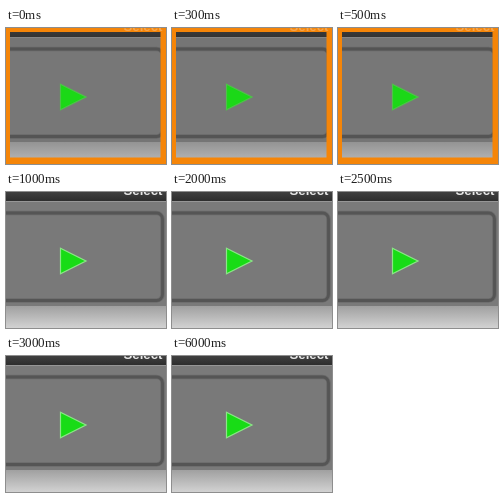
Animation, 160 px wide and 136 px high, one loop 8 s. Source, as an HTML page with a canvas:

```html
<!DOCTYPE html>
<html lang="en">
<head>
<meta charset="utf-8">
<title>Play button</title>
<style>
html, body { margin: 0; width: 100%; height: 100%; overflow: hidden; }
canvas { display: block; width: 160px; height: 136px; }
</style>
</head>
<body>
<canvas id="stage"></canvas>
<script>
const W = 160, H = 136, LOOP = 8000, HIGHLIGHT_END = 1000;
const canvas = document.getElementById('stage');
const ctx = canvas.getContext('2d');
const dpr = window.devicePixelRatio || 1;
canvas.width = W * dpr;
canvas.height = H * dpr;
ctx.scale(dpr, dpr);

const highlighted = {
  bar: ['#3d3d3d', '#333333'], rim: '#858585', page: '#757575',
  floor: ['#939393', '#bababa'],
  border: '#545454', panel: '#777777',
  play: '#1bd817', outline: '#4fc24a'
};
const plain = {
  bar: ['#404040', '#2d2d2d'], rim: '#969696', page: '#7a7a7a',
  floor: ['#a0a0a0', '#d2d2d2'],
  border: '#555555', panel: '#797979',
  play: '#18dc16', outline: '#8ce688'
};

function rect(x, y, w, h, fill) {
  ctx.fillStyle = fill;
  ctx.fillRect(x, y, w, h);
}

function gradient(y0, y1, colors) {
  const g = ctx.createLinearGradient(0, y0, 0, y1);
  colors.forEach((c, i) => g.addColorStop(i / (colors.length - 1), c));
  return g;
}

function label(color) {
  ctx.font = 'bold 13.2px "Liberation Sans", Arial, sans-serif';
  ctx.fillStyle = color;
  ctx.fillText('Select', 117.5, 3.4);
}

function outline(color, width) {
  ctx.strokeStyle = color;
  ctx.lineWidth = width;
  ctx.stroke();
}

function panel(look) {
  ctx.beginPath();
  ctx.roundRect(-20, 21, 176.5, 87.5, 6);
  ctx.fillStyle = look.panel;
  ctx.fill();
  // A wide faint stroke softens the edges of the border.
  ctx.globalAlpha = 0.4;
  outline(look.border, 4.6);
  ctx.globalAlpha = 1;
  outline(look.border, 2.8);
}

function playIcon(look) {
  ctx.beginPath();
  ctx.moveTo(54.5, 56.3);
  ctx.lineTo(80, 69);
  ctx.lineTo(54.5, 81.7);
  ctx.closePath();
  ctx.fillStyle = look.play;
  ctx.fill();
  outline(look.outline, 1.2);
}

function scene(look) {
  rect(0, 0, W, H, look.page);
  rect(0, 0, W, 9, gradient(0, 9, look.bar));
  rect(0, 9, W, 1, look.rim);
  rect(0, 114, W, 22, gradient(114, 136, look.floor));
  panel(look);
  playIcon(look);
}

function frame() {
  ctx.beginPath();
  ctx.rect(0, 0, W, H);
  ctx.rect(4, 4, 150.5, 125.5);
  ctx.fillStyle = '#f58508';
  ctx.fill('evenodd');
}

function draw(t) {
  if (t < HIGHLIGHT_END) {
    scene(highlighted);
    frame();
    label('#f3a550');
  } else {
    scene(plain);
    label('#e8e8e8');
  }
}

const start = performance.now();
function tick() {
  draw((performance.now() - start) % LOOP);
  requestAnimationFrame(tick);
}
tick();
</script>
</body>
</html>
```
